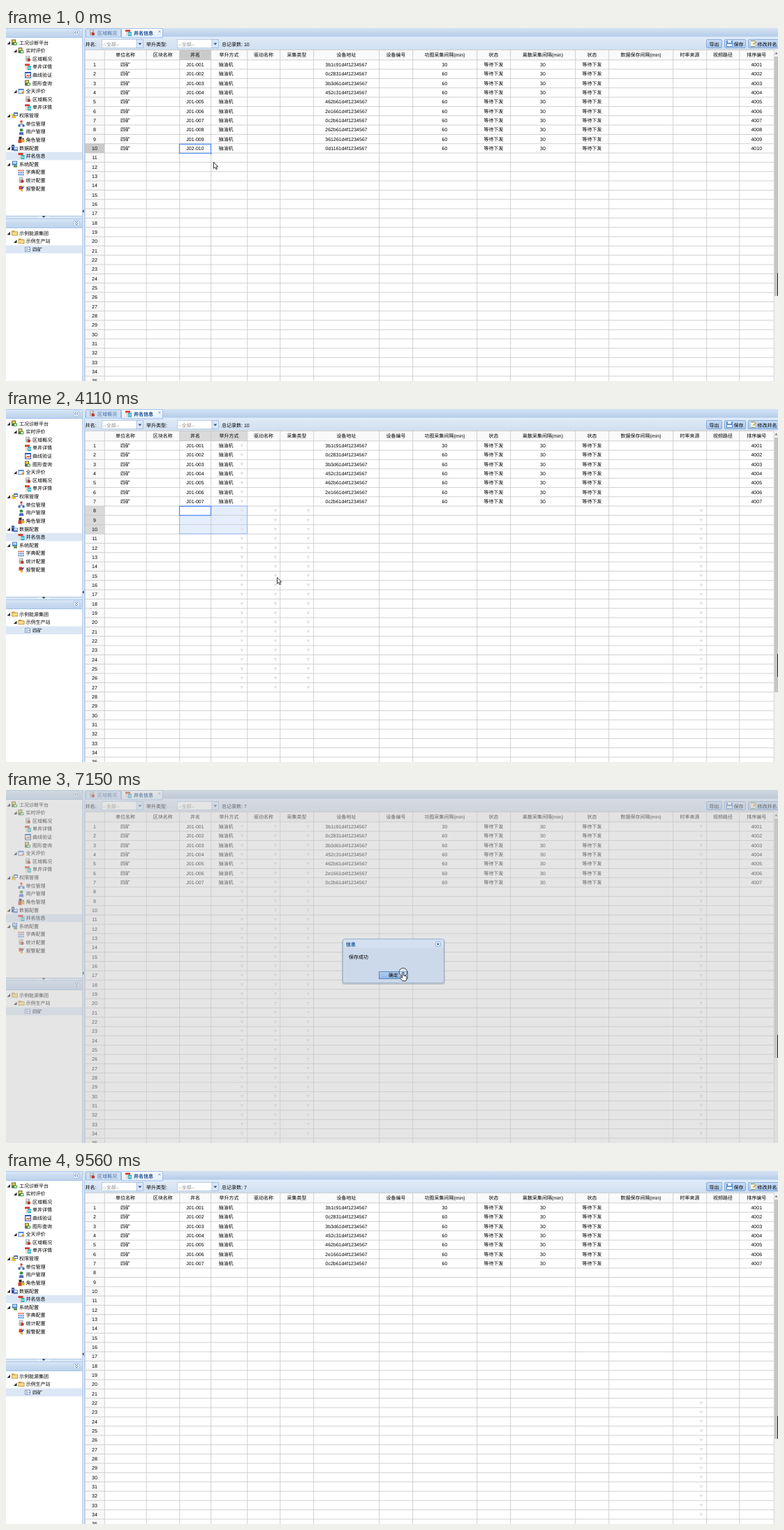
Write an HTML page that moves like this. It is 1106 px wide and 506 px high and loops after 9660 ms.

```html
<!DOCTYPE html>
<html lang="zh-CN">
<head>
<meta charset="utf-8">
<title>井名信息</title>
<style>
html, body { margin: 0; width: 100%; height: 100%; overflow: hidden; background: #fff; }
svg { display: block; width: 1106px; height: 506px; }
text { font: 7px "Liberation Sans", "Noto Sans CJK SC", "Noto Sans CJK", sans-serif; text-rendering: geometricPrecision; white-space: pre; }
.b { font-weight: bold; }
.mid { text-anchor: middle; }
</style>
</head>
<body>
<svg id="stage" viewBox="0 0 1106 506">
  <defs>
    <linearGradient id="head" x2="0" y2="1"><stop stop-color="#dfeaf8"/><stop offset=".45" stop-color="#c9dbf0"/><stop offset="1" stop-color="#bcd2ec"/></linearGradient>
    <linearGradient id="tabs" x2="0" y2="1"><stop stop-color="#d5e3f4"/><stop offset="1" stop-color="#b3cbe8"/></linearGradient>
    <linearGradient id="tabOn" x2="0" y2="1"><stop stop-color="#fff"/><stop offset="1" stop-color="#deecfd"/></linearGradient>
    <linearGradient id="bar" x2="0" y2="1"><stop stop-color="#dfe9f5"/><stop offset="1" stop-color="#d0dff0"/></linearGradient>
    <linearGradient id="btn" x2="0" y2="1"><stop stop-color="#c9ddf6"/><stop offset="1" stop-color="#a5c6ee"/></linearGradient>
    <linearGradient id="btnOver" x2="0" y2="1"><stop stop-color="#d3e4f9"/><stop offset="1" stop-color="#b4d0f2"/></linearGradient>
    <linearGradient id="btnOn" x2="0" y2="1"><stop stop-color="#b4cff0"/><stop offset="1" stop-color="#8db5e6"/></linearGradient>
  </defs>
</svg>
<script>
const LOOP = 9660, TOP = 46, ROW = 13.33;
const stage = document.getElementById('stage');

function el(parent, tag, attrs = {}) {
  const node = document.createElementNS('http://www.w3.org/2000/svg', tag);
  for (const k in attrs) node.setAttribute(k, attrs[k]);
  return parent.appendChild(node);
}
const group = (parent = stage) => el(parent, 'g');
const box = (p, x, y, w, h, fill, more = {}) => el(p, 'rect', { x, y, width: w, height: h, fill, ...more });
const path = (p, d, fill, more = {}) => el(p, 'path', { d, fill, ...more });
function label(p, x, y, str, cls = '', fill = '#000') {
  const node = el(p, 'text', { x, y: y + 2.6, class: cls, fill });
  node.textContent = str;
  return node;
}
const mid = (p, x, y, str, fill) => label(p, x, y, str, 'mid', fill);

const ICONS = {
  chart: { '#5d6840': 'M0 0h6v8h-6z', '#f2cf50': 'M1 1h4v3h-4z', '#3a9a3a': 'M3 4h5v4h-5z', '#fff': 'M4 5h3v2h-3z' },
  area: { '#b7b2ac': 'M1 0h6v8h-6z', '#e9e6e2': 'M2 1h3v2h-3z', '#b8382c': 'M4 4h3l1 1v2l-1 1h-3z' },
  well: { '#d63a2f': 'M0 0h7v3h-7z', '#ecd9c8': 'M1 3h3v6h-3z', '#2bb3c9': 'M4 3h5v6h-5z', '#fff': 'M5 5h1v2h-1zM7 5h1v2h-1z' },
  curve: { '#2a58b0': 'M0 0h9v9h-9z', '#fff': 'M1 2h7v6h-7z', '#e0592a': 'M1 6l3-2 2 1 2-2v2l-2 2-2-1-3 1z' },
  cal: { '#4a7fd0': 'M0 1h8v7h-8z', '#fff': 'M1 3h6v4h-6z', '#e88a2e': 'M5 5h3v3h-3z' },
  key: { '#eabf45': 'M0 2h6v6h-6z', '#4a6fb5': 'M3 0h6v5h-6z', '#fff': 'M4 2h4v2h-4z' },
  org: { '#d23c2f': 'M3 0h3v3h-3z', '#777': 'M4 3h1v2h-1zM1 5h7v1h-7z', '#2c5fb8': 'M0 6h3v3h-3zM6 6h3v3h-3z' },
  user: { '#3b8d4a': 'M3 0h3l1 2-1 2h-3l-1-2z', '#4a66c0': 'M1 9l1-4h5l1 4z' },
  role: { '#3a2a20': 'M1 0h4v4h-4zM6 2h2v2h-2z', '#c9402f': 'M0 4h5v5h-5z', '#e0a820': 'M5 4h4v4h-4z' },
  db: { '#24439b': 'M0 0h4v8h-4z', '#5f86d8': 'M3 3h6v6h-6z', '#fff': 'M4 4h4v2h-4zM1 2h2v1h-2z' },
  pc: { '#3f78c0': 'M1 0h7v6h-7z', '#bfe0ff': 'M2 1h5v3h-5z', '#67934f': 'M3 6h5v3h-5z' },
  dict: { '#e0543f': 'M0 1h8v2h-8z', '#4a7fd0': 'M0 4h8v2h-8zM0 7h8v2h-8z', '#fff': 'M2 0h1v9h-1zM5 0h1v9h-1z' },
  alarm: { '#d8402c': 'M1 1h5v5h-5z', '#2a4fb0': 'M5 3l4-2-3 5z', '#eab02e': 'M3 5l4 2-1 2-3-1z' },
  folder: { '#c79a3a': 'M0 1h4l1 1h4v6h-9z', '#f7dd8c': 'M1 3h7v4h-7z' },
  leaf: { '#7b96c0': 'M0 1h8v7h-8z', '#fff': 'M1 2h6v5h-6z', '#4a6fb5': 'M2 3h2v1h-2zM2 5h2v1h-2zM5 4h2v1h-2z' },
  save: { '#5c90cf': 'M0 0h9v9h-9z', '#f2f8fe': 'M2 0h5v3h-5zM1 5h7v3h-7z' },
  edit: { '#f4f0d8': 'M1 0h6v9h-6z', '#8a8f55': 'M1 0h6v1h-6zM1 8h6v1h-6z', '#d89a28': 'M4 5l4-4 1 1-4 4z' }
};
function icon(p, x, y, kind) {
  const g = el(p, 'g', { transform: `translate(${x} ${y - 4.5})` });
  for (const color in ICONS[kind]) path(g, ICONS[kind][color], color);
}

// Grid
const X = [113, 141, 201, 248.5, 293.5, 345.5, 392.5, 440.5, 534.5, 582.5, 674.5, 722.5, 815.5, 863.5, 955.5, 1003.5, 1050.5, 1100];
const HEADS = '单位名称 区块名称 井名 举升方式 驱动名称 采集类型 设备地址 设备编号 功图采集间隔(min) 状态 离散采集间隔(min) 状态 数据保存间隔(min) 时率来源 视频路径 排序编号'.split(' ');
const IDS = '3b1c91 0c2831 3b3d61 452c31 462b61 2e1661 0c2b61 262b61 361261 0d1161'.split(' ');
const rowTop = r => Math.round(TOP + ROW * r);
const rowMid = r => TOP + ROW * r + 6.5;
const colMid = c => (X[c + 1] + X[c + 2]) / 2;

const grid = group();
box(grid, 113, 31, 987, 15, '#fafafa');
box(grid, 113, TOP, 28, 460, '#f9f9f9');
const stale = box(grid, 113, rowTop(10), 28, 13, '#efefef');
const rowMark = box(grid, 113, 0, 28, 13, '#ccc');
const colMark = box(grid, 0, 31, 10, 15, '#ccc');
const area = box(grid, 0, 0, 1, 1, '#e5eefd');
const anchorBack = box(grid, 0, 0, 1, 1, '#fff');

let lines = 'M113 31.5H1100';
for (let r = 0; r < 35; r++) lines += `M113 ${TOP + ROW * r - .2}H1100`;
for (const x of X) lines += `M${x + .25} 31V506`;
path(grid, lines, 'none', { stroke: '#c6c6c6', 'stroke-width': .8 });

const areaEdge = box(grid, 0, 0, 1, 1, 'none', { stroke: '#89aff9', 'stroke-width': .8 });
const anchorEdge = box(grid, 0, 0, 1, 1, 'none', { stroke: '#4b89f0', 'stroke-width': 1.2 });
const handle = box(grid, 0, 0, 3, 3, '#4b89f0', { stroke: '#fff', 'stroke-width': .5 });

HEADS.forEach((h, c) => mid(grid, colMid(c), 38.5, h));
for (let r = 0; r < 35; r++) mid(grid, 127, rowMid(r), String(r + 1));
const kept = group(grid), dropped = group(grid);
IDS.forEach((id, r) => {
  const n = String(r + 1).padStart(3, '0');
  const cells = { 0: '四矿', 2: (r < 9 ? 'J01-' : 'J02-') + n, 3: '抽油机', 6: id + 'd4f1234567', 8: r ? '60' : '30', 9: '等待下发', 10: '30', 11: '等待下发', 15: '4' + n };
  for (const c in cells) mid(r < 7 ? kept : dropped, colMid(+c) - (c == 3 ? 4.5 : 0), rowMid(r), cells[c]);
});

function arrows(cols, from, to) {
  const g = group(grid);
  for (const x of cols)
    for (let r = from; r <= to; r++) path(g, `M${x - 2.5} ${rowMid(r - 1) - 2}h5l-2.5 4.5z`, '#e2e2e2');
  return g;
}
const DROPS = [338, 386, 433, 996];

// Scrollbar
box(stage, 1101, 31, 5, 475, '#f1f1f1');
path(stage, 'M1101.5 37.5l2-3 2 3z', '#777');
const thumb = box(stage, 1101, 41, 5, 343, '#c4c4c4');

// Side panel
const side = group();
box(side, 0, 0, 113, 506, '#dae6f4');
function panel(y, h, glyph) {
  box(side, 0, y, 109, 14, 'url(#head)');
  path(side, `M0 ${y + .5}H109M0 ${y + 13.5}H109`, 'none', { stroke: '#99bce8', 'stroke-width': .7 });
  box(side, 0, y + 14, 109, h, '#fff');
  box(side, 97, y + 2.5, 8, 8, '#e3eefb', { stroke: '#9dbbe0', 'stroke-width': .7, rx: 1 });
  path(side, glyph, 'none', { stroke: '#4d6d9a', 'stroke-width': .9 });
}
panel(0, 255, 'M100.5 4.5l-2 2 2 2M103.5 4.5l-2 2 2 2');
panel(273, 219, 'M99 277l2 2 2-2M99 280l2 2 2-2');
path(side, 'M109.5 0V506M112.5 13V506M0 269.5H109', 'none', { stroke: '#a9c4e4', 'stroke-width': .8 });
box(side, 45, 270, 18, 2.5, '#e6effa');
path(side, 'M51.5 269.5h5l-2.5 2.5z', '#333');
path(side, 'M111.5 260v5l-2-2.5z', '#333');

function tree(y0, rows, picked) {
  rows.forEach((row, i) => {
    const [depth, kind, name, open] = row.split(' ');
    const y = y0 + 11.61 * i, x = 8 + 9.5 * depth;
    if (i === picked) box(side, 0, y - 5.8, 109, 11.6, '#dce7f5');
    if (open) path(side, `M${x - 2} ${y - 2}v4.5h-4.5z`, '#222');
    icon(side, x, y, kind);
    label(side, x + 11, y, name);
  });
}
tree(21, ['0 chart 工况诊断平台 +', '1 chart 实时评价 +', '2 area 区域概况', '2 well 单井详情', '2 curve 曲线验证', '2 chart 图形查询',
  '1 cal 全天评价 +', '2 area 区域概况', '2 well 单井详情', '0 key 权限管理 +', '1 org 单位管理', '1 user 用户管理', '1 role 角色管理',
  '0 db 数据配置 +', '1 well 井名信息', '0 pc 系统配置 +', '1 dict 字典配置', '1 area 统计配置', '1 alarm 报警配置'], 14);
tree(294, ['0 folder 示例能源集团 +', '1 folder 示例生产站 +', '2 leaf 四矿'], 2);

// Tabs and toolbar
const bar = group();
box(bar, 113, 0, 993, 13, 'url(#tabs)');
box(bar, 113, 12.5, 993, 2.5, '#deecfd');
path(bar, 'M114.5 13V2.5q0-1.5 1.5-1.5h47q1.5 0 1.5 1.5V13z', '#cfdff3', { stroke: '#8db2e3', 'stroke-width': .8 });
path(bar, 'M165.5 14V2q0-1.5 1.5-1.5h56q1.5 0 1.5 1.5V14z', 'url(#tabOn)', { stroke: '#8db2e3', 'stroke-width': .8 });
icon(bar, 119, 7, 'area');
label(bar, 131, 7, '区域概况', '', '#416da3');
icon(bar, 171, 7, 'well');
label(bar, 183, 7, '井名信息', 'b', '#15498b');
path(bar, 'M218.3 3.5l3 3m0-3l-3 3', 'none', { stroke: '#7f98bb', 'stroke-width': .9 });
box(bar, 113, 15, 993, 16, 'url(#bar)');
label(bar, 113.5, 23, '井名:');
label(bar, 201, 23, '举升类型:');
const total = label(bar, 309, 23, '总记录数: 10');
for (const x of [137, 245]) {
  box(bar, x + .5, 16.5, 50, 12, '#fff', { stroke: '#b5c6da', 'stroke-width': .8 });
  label(bar, x + 2, 23, '--全部--', '', '#888');
  box(bar, x + 50, 16.5, 9.5, 12, '#d9e7f8', { stroke: '#9ebbe0', 'stroke-width': .8 });
  path(bar, `M${x + 52.3} 21.5h5l-2.5 3z`, '#34537c');
}
function button(x, w, name, kind) {
  const b = box(bar, x + .5, 16.5, w, 12, 'url(#btn)', { rx: 1.5, stroke: '#83a8d6', 'stroke-width': .9 });
  if (kind) icon(bar, x + 3, 22.5, kind);
  label(bar, x + (kind ? 13.5 : 4.5), 23, name);
  return b;
}
button(1003, 22, '导出');
const saveBtn = button(1029, 30, '保存', 'save');
button(1063, 50, '修改井名', 'edit');

// Context menu
const menu = group();
box(menu, 329.5, 173.5, 117, 151, '#000', { opacity: .12 });
box(menu, 328.5, 172.5, 116, 150, '#fff', { stroke: '#bdbdbd' });
const hover = box(menu, 329, 0, 115, 15, '#f0f0f0');
['向上插入一行', '向下插入一行', '向左插入一列', '向右插入一列', '删除行', '删除列', '合并单元格', '复制', '剪切', '粘贴']
  .forEach((s, i) => mid(menu, 387, 180.5 + 15.05 * i, s, [2, 3, 5].includes(i) ? '#aaa' : '#111'));

// Message box
const dialog = group();
box(dialog, 0, 0, 1106, 506, '#ccc', { opacity: .5 });
box(dialog, 481, 214, 148, 65, '#000', { opacity: .14, rx: 4 });
box(dialog, 482.5, 213.5, 145, 63, '#cbd9ea', { rx: 3, stroke: '#9ab3d1' });
box(dialog, 483.5, 214.5, 143, 12, '#d3e0f0', { rx: 2 });
label(dialog, 487, 221, '信息', 'b', '#1a5294');
box(dialog, 615.5, 217.5, 7, 7, '#e6effa', { rx: 1, stroke: '#89a9d0', 'stroke-width': .8 });
path(dialog, 'M617.3 219.3l3.4 3.4m0-3.4l-3.4 3.4', 'none', { stroke: '#3c5f90', 'stroke-width': 1 });
label(dialog, 491, 239.5, '保存成功');
const okBtn = box(dialog, 534.5, 260.5, 41, 10, '#e8e8e8', { stroke: '#9b9b9b' });
mid(dialog, 555, 265.5, '确定');

box(stage, 1105, 351, 1, 33, '#2a2a2a');

// Pointer
const pointer = group();
const ring = el(pointer, 'circle', { r: 5.8, fill: '#fff', 'fill-opacity': .3, stroke: '#444', 'stroke-width': .9 });
const ink = { stroke: '#222', 'stroke-width': .9, 'stroke-linejoin': 'round' };
const arrow = path(pointer, 'M.5 .5V9.3l2-1.8 1.5 3.3 1.5-.7-1.4-3.2h2.7z', '#fff', ink);
const hand = path(pointer, 'M-1.2 .8q1-1.2 2 0V5l3 .6q1.6.4 1.4 2L4.6 11 4 12.6H-1L-4.3 8.3q-.4-1.5 1-1.3l2.1 1.4z', '#fff', ink);

// Each move: start, end, steps, from x, from y, to x, to y
const MOVES = [
  [710, 1250, 5, 297, 192, 265, 140],
  [1650, 2297, 5, 265, 140, 328, 172],
  [3300, 3705, 4, 328, 172, 388, 241],
  [4510, 5153, 6, 388, 241, 1086, 22],
  [5281, 5410, 2, 1086, 22, 1047, 16],
  [6440, 7013, 5, 1047, 16, 569, 261],
  [8020, 8280, 3, 569, 261, 1070, 493]
];
const ease = p => p * p * (3 - 2 * p);
function position(t) {
  let [x, y] = [297, 192];
  for (const [t0, t1, n, x0, y0, x1, y1] of MOVES) {
    if (t < t0) break;
    const step = Math.min(n, 1 + Math.floor((t - t0) / (t1 - t0) * (n - 1) + 1e-6));
    const p = ease(step / n);
    x = x0 + (x1 - x0) * p;
    y = y0 + (y1 - y0) * p;
  }
  return [x, y];
}

const inside = (t, ...spans) => spans.some(([a, b]) => t >= a && t < b);
const show = (node, on) => node.setAttribute('display', on ? 'inline' : 'none');
const set = (node, attrs) => { for (const k in attrs) node.setAttribute(k, attrs[k]); };

const SPANS = [
  [dropped, [0, 3975]],
  [stale, [5560, 5990]],
  [menu, [2620, 3975]],
  [dialog, [5990, 7300]],
  [arrows([338], 1, 10), [2297, 7300]],
  [arrows([433], 10, 10), [2620, 3975]],
  [arrows(DROPS, 11, 27), [3975, 7300]],
  [arrows([386, 433, 996], 8, 10), [3975, 7300]],
  [arrows([386, 433, 996], 1, 7), [5410, 7300]],
  [arrows(DROPS, 28, 34), [5990, 7300]],
  [arrows([996], 22, 34), [8280, LOOP]],
  [ring, [1650, 2458], [3840, 3975], [5560, 5680], [7150, 7300]],
  [pointer, [0, 8410]]
];

function select(t, x, y) {
  const dragged = t >= 1650, on = t < 5560;
  for (const n of [rowMark, colMark, anchorBack, anchorEdge]) show(n, on);
  for (const n of [area, areaEdge]) show(n, on && dragged);
  show(handle, !dragged);
  if (!on) return;
  const top = dragged ? 7 : 9;
  const done = t >= 2297;
  const last = !dragged || done ? 9 : Math.max(7, Math.floor((y - TOP) / ROW));
  const right = dragged && (done || x > X[4]) ? X[5] : X[4];
  const span = { y: rowTop(top), height: rowTop(last + 1) - rowTop(top) };
  const tint = dragged ? '#dadada' : '#cacaca';
  const cell = { x: X[3], y: rowTop(top) + .5, width: X[4] - X[3], height: 13 };
  set(rowMark, { ...span, fill: tint });
  set(colMark, { x: X[3], width: right - X[3], fill: tint });
  for (const n of [area, areaEdge]) set(n, { x: X[3], width: right - X[3], ...span });
  for (const n of [anchorBack, anchorEdge]) set(n, cell);
  set(handle, { x: X[4] - 1.5, y: rowTop(top + 1) - 1 });
}

function render(t) {
  const [x, y] = position(t);
  for (const [node, ...spans] of SPANS) show(node, inside(t, ...spans));
  select(t, x, y);
  const item = Math.floor((y - 173) / 15.05);
  show(hover, t >= 3300 && x > 329);
  set(hover, { y: 173 + 15.05 * item });
  set(thumb, { height: inside(t, [3975, 6440]) ? 365 : 343 });
  set(saveBtn, { fill: inside(t, [5410, 9560]) ? 'url(#btnOver)' : 'url(#btn)' });
  set(okBtn, t >= 7013 ? { fill: 'url(#btnOn)', stroke: '#5f87b8' } : { fill: '#e8e8e8', stroke: '#9b9b9b' });
  const count = t < 6140 ? '总记录数: 10' : '总记录数: 7';
  if (total.textContent !== count) total.textContent = count;
  const pointing = inside(t, [5560, 5990], [7013, 8020]);
  show(hand, pointing);
  show(arrow, !pointing);
  set(pointer, { transform: `translate(${x} ${y})` });
}

const start = performance.now();
function tick() {
  render((performance.now() - start) % LOOP);
  requestAnimationFrame(tick);
}
tick();
</script>
</body>
</html>
```
